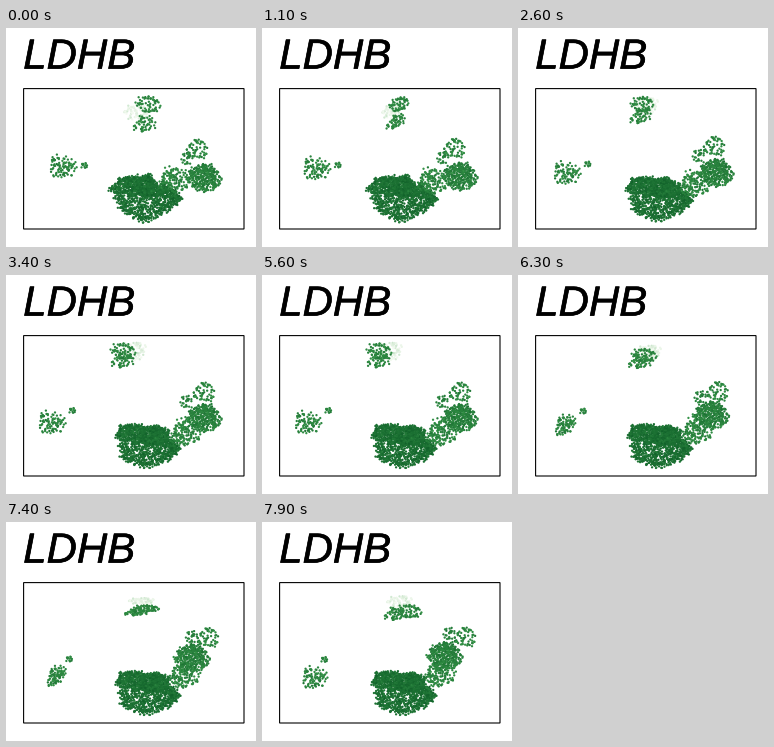
A matplotlib script for the animation above (8000 ms loop, 250 by 219 pixels).

```python
import numpy as np
import matplotlib.pyplot as plt
from matplotlib.animation import FuncAnimation
from matplotlib.colors import LinearSegmentedColormap
from matplotlib.patches import Rectangle
from matplotlib.patheffects import withStroke

W, H, DPI = 250, 219, 128
PT = 72 / DPI                       # points per pixel
STEP, FRAMES = 100, 80
PHASES = [500, 3400, 5600, 7900]    # drift, rest, drift

rng = np.random.default_rng(7)
greens = LinearSegmentedColormap.from_list(
    "cells", [(0, "#f3faf0"), (0.6, "#3b9c4c"), (1, "#12632b")])


def blend(start, rest, end, ms):
    """Drift linearly from start to rest, pause, then on to end."""
    p = np.interp(ms, PHASES, [0, 1, 1, 2])
    if p <= 1:
        return start + p * (rest - start)
    return rest + (p - 1) * (end - rest)


def pinch(xy, ms, when, deg):
    """Flatten points onto a tilted line around the given time."""
    normal = np.array([-np.sin(np.radians(deg)), np.cos(np.radians(deg))])
    amount = 0.75 * np.exp(-((ms - when) / 700) ** 2)
    return xy - amount * np.outer(xy @ normal, normal)


class Blob:
    """Elliptic cloud whose centre moves through three places."""

    def __init__(self, rx, ry, path, density=0.55, level=0.76, pinches=()):
        n = round(density * rx * ry)
        a = rng.uniform(0, 2 * np.pi, n)
        r = np.sqrt(rng.random(n)) * rng.normal(1, 0.12, n)
        self.xy = np.column_stack([rx * r * np.cos(a), ry * r * np.sin(a)])
        self.path = np.array(path, float)
        self.pinches = pinches
        self.values = rng.normal(level, 0.05, n)

    def points(self, ms):
        xy = self.xy
        for when, deg in self.pinches:
            xy = pinch(xy, ms, when, deg)
        return xy + blend(*self.path, ms)


class Body:
    """Dense cluster filling an outline that settles into another."""

    def __init__(self, n, start, rest):
        self.start, self.rest = np.array(start, float), np.array(rest, float)
        self.side = rng.integers(len(start), size=n)
        self.along = rng.random((n, 1))
        self.out = rng.random((n, 1)) ** 0.52
        self.jitter = rng.normal(0, 1, (n, 2))
        self.values = rng.normal(0.91, 0.05, n)

    def points(self, ms):
        v = blend(self.start, self.rest, self.rest, ms)
        mid = v.mean(axis=0) + (-3, 3)
        a, b = v[self.side], np.roll(v, -1, axis=0)[self.side]
        rim = a + self.along * (b - a)
        return mid + self.out * (rim - mid) + self.jitter


top_turns = [(1700, -50), (7100, 0)]
left_turn = [(6900, -61)]

groups = [
    # top: pale part and two expressing parts
    Blob(12, 9, [(131, 84), (128, 75), (138, 80)], 0.8, 0.04, top_turns),
    Blob(13, 9, [(142, 76), (117, 76), (147, 89)], pinches=top_turns),
    Blob(13, 8, [(138, 96), (116, 85), (133, 92)], pinches=top_turns),
    # left, with its satellite
    Blob(14, 12, [(55, 138), (44, 147), (51, 155)], pinches=left_turn),
    Blob(4, 3, [(77, 138), (65, 136), (61, 138)], density=1),
    # right arm, from the bridge upwards
    Blob(15, 13, [(168, 153), (180, 158), (178, 152)], 0.75),
    Blob(16, 13, [(198, 150), (198, 143), (183, 134)], 1.6, 0.8),
    Blob(7, 6, [(181, 131), (180, 127), (187, 112)]),
    Blob(12, 9, [(191, 121), (198, 117), (203, 115)]),
    Body(1450,
         [(104, 161), (112, 151), (127, 149), (143, 146), (152, 156),
          (166, 161), (177, 171), (163, 184), (137, 195), (114, 181)],
         [(111, 161), (113, 151), (130, 150), (149, 151), (161, 153),
          (164, 164), (175, 174), (164, 186), (138, 193), (115, 183)]),
]

# Shuffled draw order, with the pale cells underneath
values = np.concatenate([g.values for g in groups])
order = rng.permutation(len(values))
order = order[np.argsort(values[order] > 0.3, kind="stable")]


def cells(ms):
    return np.concatenate([g.points(ms) for g in groups])[order]


fig = plt.figure(figsize=(W / DPI, H / DPI), dpi=DPI, facecolor="white")
ax = fig.add_axes([0, 0, 1, 1])
ax.set(xlim=(0, W), ylim=(H, 0))
ax.axis("off")

dots = ax.scatter(*cells(0).T, s=(2.3 * PT) ** 2, linewidths=0,
                  c=greens(values[order]))
ax.add_patch(Rectangle((17.6, 60.6), 220.4, 140.4, fill=False,
                       ec="black", lw=1.1 * PT, snap=False))
ax.text(17.2, 40.6, "LDHB", fontsize=42 * PT, family="Liberation Sans",
        style="italic", va="baseline", ha="left",
        path_effects=[withStroke(linewidth=0.6 * PT, foreground="black")])


def update(i):
    dots.set_offsets(cells(i * STEP))
    return (dots,)


anim = FuncAnimation(fig, update, frames=FRAMES, interval=STEP,
                     repeat=True, repeat_delay=0, blit=False)
plt.show()
```
